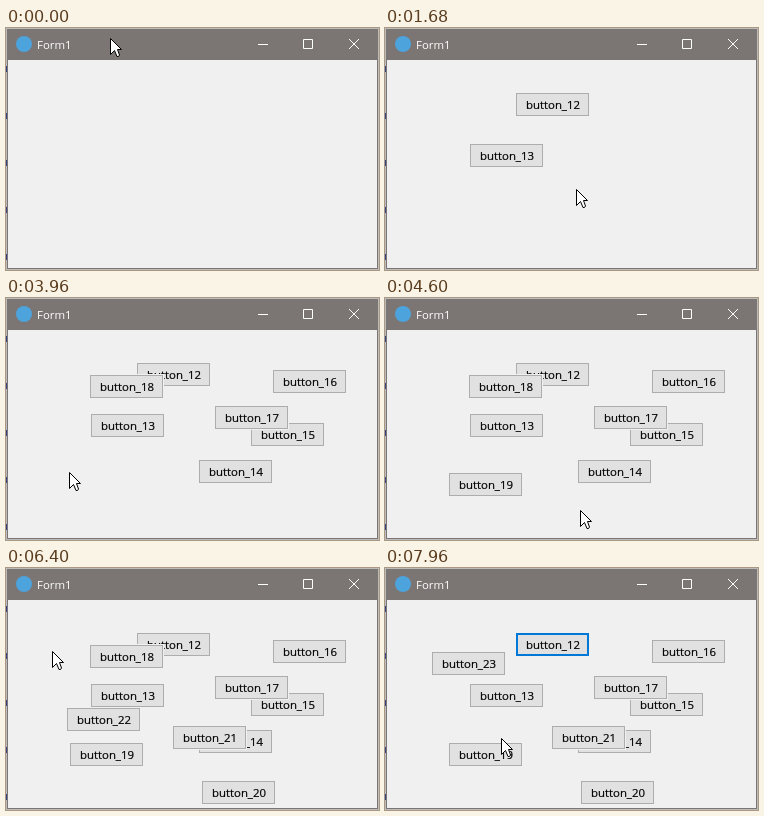
These frames come from a looping animation (373 by 242 pixels, 8000 ms). An HTML page:

```html
<!DOCTYPE html>
<html lang="en">
<head>
<meta charset="utf-8">
<title>Form1</title>
<style>
  html, body { margin: 0; width: 100%; height: 100%; overflow: hidden; background: #fff; }
  svg { display: block; width: 100vw; height: 100vh; }
  text { font: 11.4px "Open Sans", "Noto Sans", sans-serif; }
  #buttons text { text-anchor: middle; stroke: #000; stroke-width: .2; }
  .glyph { fill: none; stroke: #fff; }
</style>
</head>
<body>
<svg viewBox="0 0 373 242">
  <rect width="373" height="242" fill="#bcbcbc"/>
  <path d="M.5 38V240" stroke="#3c4488" stroke-dasharray="6 41"/>
  <rect x="1.5" y="1.5" width="370" height="239" fill="#f0f0f0" stroke="#7b7574"/>
  <rect x="1" y="1" width="371" height="31" fill="#7b7574"/>
  <circle cx="18" cy="16" r="8" fill="#4da3dc"/>
  <text x="31" y="21" fill="#fff">Form1</text>
  <path class="glyph" d="M252 16.5h10M297.5 11.5h9v9h-9z"/>
  <path class="glyph" d="M343 11l10 10M353 11l-10 10"/>
  <g id="buttons"></g>
  <circle id="halo" r="12" fill="#ff0" opacity=".55"/>
  <path id="cursor" d="M.5.5V16.5L4.5 12.5 7 18.5H8.5L9.5 17 7.5 11.5H11.5Z"
        fill="#fff" stroke="#000" stroke-linejoin="round"/>
</svg>
<script>
const LOOP = 8000, TICK = 40, FADE = 200;
const WIDTH = 73, HEIGHT = 23, FIRST_ID = 12;
const MS_PER_PX = 3.2, REST = 20;

// the pointer's resting places: x, y, time of the press, how long it is held
const start = { x: 104, y: 10, up: 420 };
const clicks = [
  [130, 64, 880], [84, 115, 1320], [192, 161, 1760, 80], [244, 124, 2160, 80],
  [266, 71, 2680], [208, 107, 3120], [83, 76, 3640], [63, 174, 4040, 80],
  [195, 212, 4680, 80], [166, 157, 5280, 120], [60, 139, 6040], [46, 83, 6440, 80],
  [128, 91, 6920, 120], [100, 157, 7720, 120], [116, 170, LOOP]
].map(([x, y, down, hold = 0]) => ({ x, y, down, up: down + hold }));

const buttons = [];
const alive = (b, t) => t >= b.born && t < b.gone;
const held = (click, t) => t >= click.down && t < click.up;
const mix = (a, b, k) => `rgb(${a.map((v, i) => Math.round(v + (b[i] - v) * k))})`;

const buttonAt = (x, y, t) => buttons.findLast(b => alive(b, t) &&
  x >= b.x - 1 && x <= b.x + WIDTH && y >= b.y - 1 && y <= b.y + HEIGHT);

const setAll = (el, attrs) => {
  for (const key in attrs) el.setAttribute(key, attrs[key]);
  return el;
};
const make = (name, attrs, parent) =>
  parent.appendChild(setAll(document.createElementNS("http://www.w3.org/2000/svg", name), attrs));

function addButton(x, y, born) {
  const group = make("g", { transform: `translate(${x} ${y})` }, document.getElementById("buttons"));
  make("rect", { x: -1, y: -1, width: WIDTH + 2, height: HEIGHT + 2, fill: "#f0f0f0" }, group);
  const face = make("rect", {}, group);
  make("text", { x: 37, y: 16 }, group).textContent = "button_" + (FIRST_ID + buttons.length);
  buttons.push({ x, y, born, gone: Infinity, group, face });
}

// a click on a button removes it, a click on the form adds one
for (const click of clicks) {
  click.hit = buttonAt(click.x, click.y, click.down);
  if (click.hit) click.hit.gone = click.up;
  else addButton(click.x + 1, click.y + 1, click.up);
}

function pointer(t) {
  let from = start;
  let { x, y } = start;
  for (const to of clicks) {
    const begin = from.up + REST;
    if (t <= begin) break;
    const duration = MS_PER_PX * Math.hypot(to.x - from.x, to.y - from.y);
    const k = 1 - (1 - Math.min(1, (t - begin) / duration)) ** 2;
    x = from.x + (to.x - from.x) * k;
    y = from.y + (to.y - from.y) * k;
    from = to;
  }
  return [Math.round(x), Math.round(y)];
}

// hover glow decays after the pointer leaves
function glow(b, t) {
  for (let age = 0; age < FADE && age <= t; age += TICK)
    if (buttonAt(...pointer(t - age), t - age) === b) return 1 - age / FADE;
  return 0;
}

// a press focuses its button; once that is removed, the first one gets the focus
function focusedButton(t) {
  const last = clicks.findLast(c => c.hit && t >= c.down);
  return last && (t < last.up ? last.hit : buttons[0]);
}

function paint(b, t) {
  const shown = alive(b, t);
  b.group.style.display = shown ? "" : "none";
  if (!shown) return;
  const level = glow(b, t);
  const pressed = clicks.some(c => c.hit === b && held(c, t));
  const focused = !pressed && focusedButton(t) === b;
  const line = focused ? 2 : 1;
  setAll(b.face, {
    x: line / 2, y: line / 2, width: WIDTH - line, height: HEIGHT - line, "stroke-width": line,
    fill: pressed ? "#cce4f7" : mix([225, 225, 225], [229, 241, 251], level),
    stroke: pressed ? "#005499" : focused ? "#0078d7" : mix([173, 173, 173], [0, 120, 215], level)
  });
}

const cursor = document.getElementById("cursor");
const halo = document.getElementById("halo");
const begin = performance.now();

function frame() {
  const now = Math.max(0, performance.now() - begin) % LOOP;
  const t = Math.floor(now / TICK) * TICK;
  const transform = `translate(${pointer(t).join(" ")})`;
  setAll(cursor, { transform });
  setAll(halo, { transform });
  halo.style.display = clicks.some(c => held(c, t)) ? "" : "none";
  buttons.forEach(b => paint(b, t));
  requestAnimationFrame(frame);
}
frame();
</script>
</body>
</html>
```
